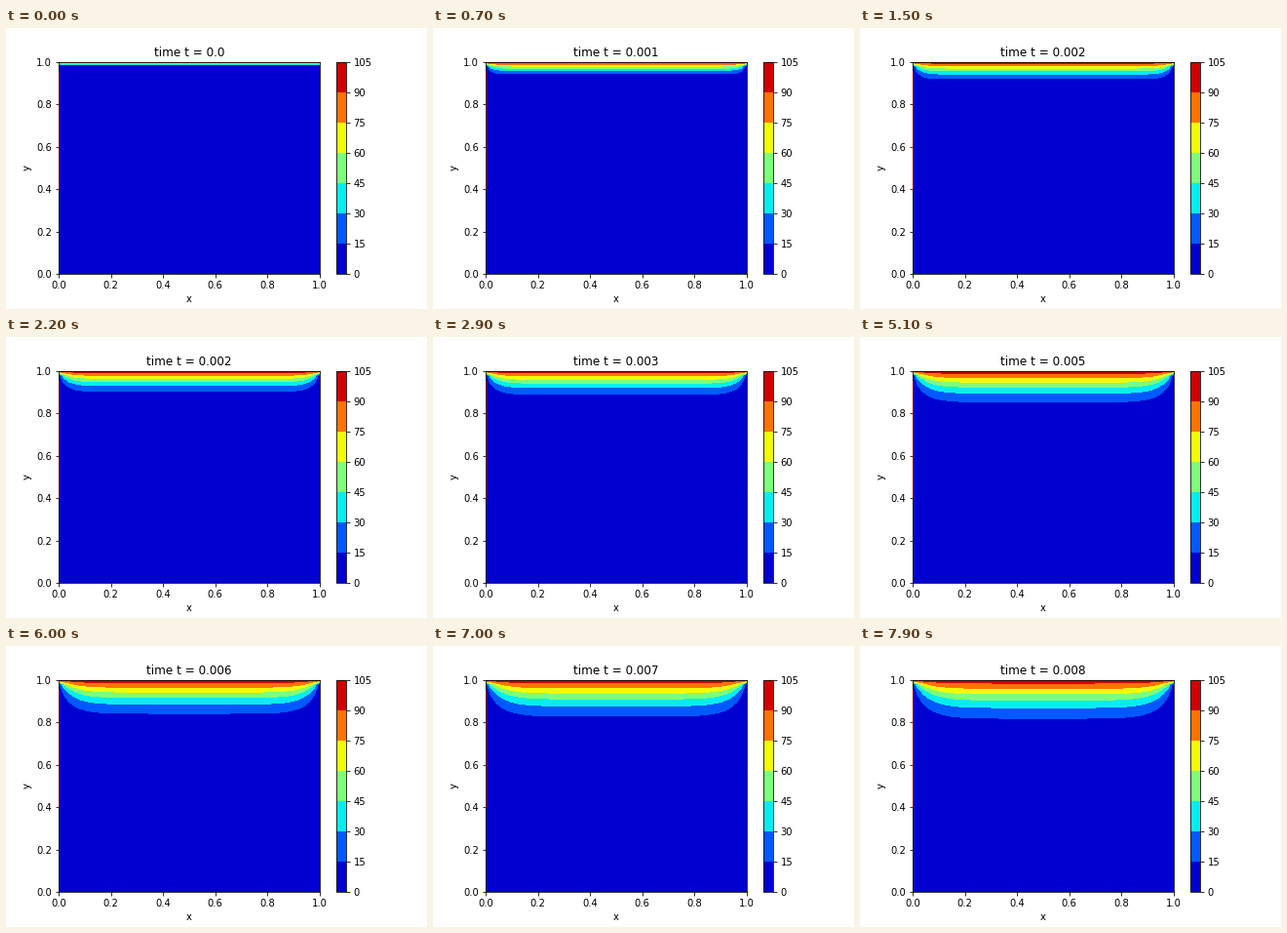
A matplotlib script that plays this animation: 432x288 px, repeating every 8 s.

```python
import numpy as np
import matplotlib.pyplot as plt
from matplotlib.animation import FuncAnimation

N = 51             # grid points per side
STEPS = 80         # one time step per frame
LEVELS = np.arange(0, 106, 15)

plt.rcParams.update({"font.family": "DejaVu Sans", "font.size": 10})


def solve():
    """Explicit heat equation at dt = dx**2 / 4: hot top edge, cold sides."""
    u = np.zeros((N, N))
    u[-1] = 100
    states = [u]
    for _ in range(STEPS - 1):
        nxt = u.copy()
        nxt[1:-1, 1:-1] = (u[2:, 1:-1] + u[:-2, 1:-1]
                           + u[1:-1, 2:] + u[1:-1, :-2]) / 4
        states.append(nxt)
        u = nxt
    return states


states = solve()
grid = np.linspace(0, 1, N)

fig, ax = plt.subplots(figsize=(6, 4), dpi=72)
fig.subplots_adjust(left=0.125, right=0.9, bottom=0.125, top=0.88)


def draw_field(k):
    return ax.contourf(grid, grid, states[k], levels=LEVELS, cmap="jet")


field = draw_field(0)
fig.colorbar(field, ax=ax, ticks=LEVELS)
ax.set(xlabel="x", ylabel="y")
ax.plot([0, 0], [0.4, 0.95], color="#8b0000", lw=1, zorder=3, clip_on=False)


def update(k):
    global field
    field.remove()
    field = draw_field(k)
    ax.set_xlim(0, 1)
    ax.set_ylim(0, 1)
    ax.set_title(f"time t = {(k + 5) // 10 / 1000}")
    return []


anim = FuncAnimation(fig, update, frames=STEPS, interval=100,
                     repeat=True, repeat_delay=0, blit=False)
plt.show()
```
